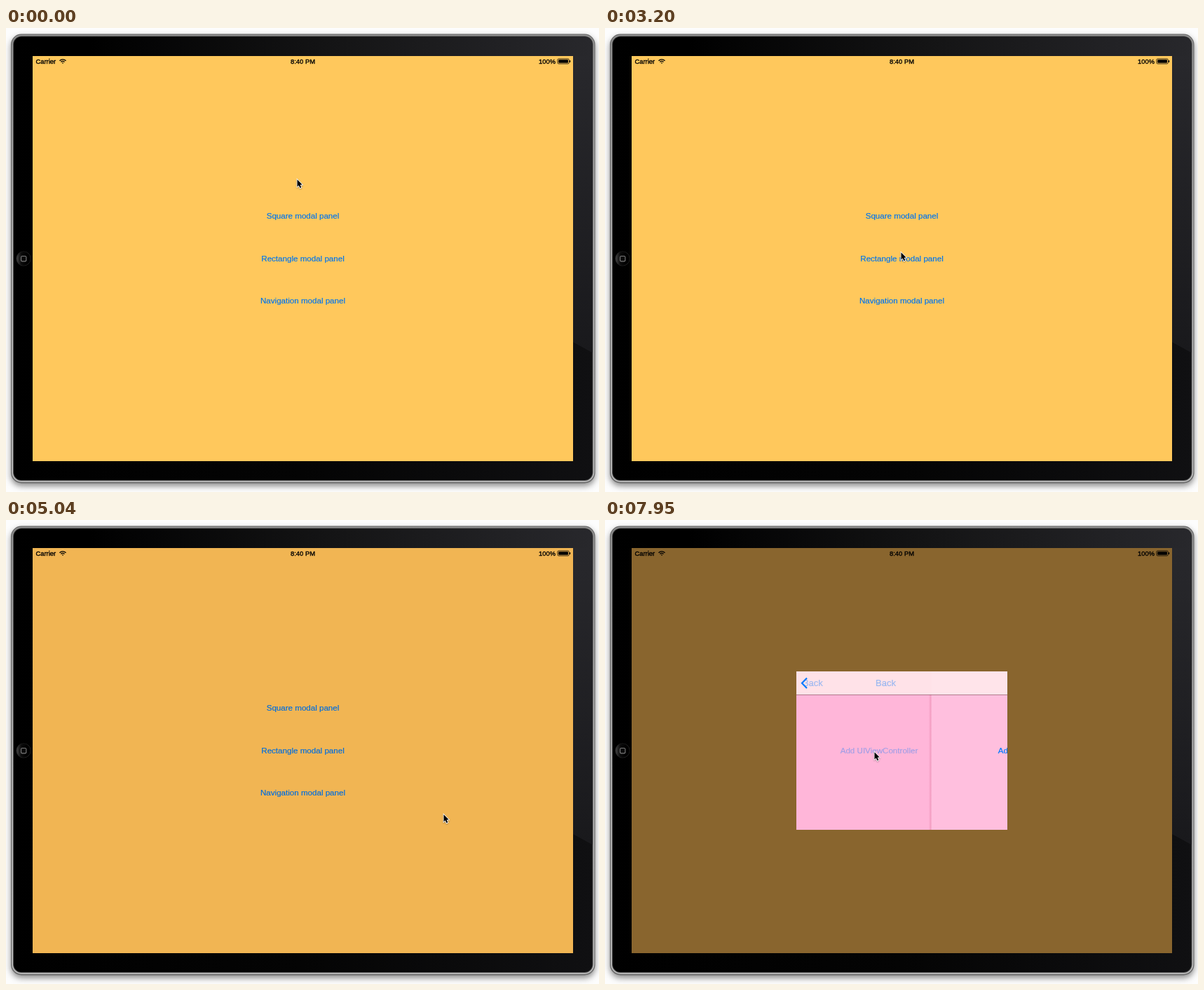
An HTML page with a canvas that plays this animation: 846 by 662 pixels, repeating every 8000 ms.

```html
<!DOCTYPE html>
<html lang="en">
<head>
<meta charset="utf-8">
<title>Modal panels</title>
<style>
html, body { margin: 0; width: 100%; height: 100%; overflow: hidden; background: #fdfdfd; }
canvas { display: block; }
</style>
</head>
<body>
<canvas id="stage" width="846" height="662"></canvas>
<script>
const ctx = document.getElementById('stage').getContext('2d');
const LOOP = 8000;
const STEP = 115;      // the picture advances in steps, like a screen capture
const FADE = 230;
const TRAVEL = 500;    // distance a panel slides
const FONT = '"Liberation Sans", Arial, sans-serif';
const BLUE = [0, 122, 255];
const SCREEN = [38, 40, 771, 578];
const MID = { x: 424, y: 329 };

const PANELS = [
  { name: 'Square modal panel', press: 1360, show: 1442, hide: 2960, w: 226, h: 226, draw: plainPanel },
  { name: 'Rectangle modal panel', press: 3760, show: 3806, hide: 4880, w: 301, h: 151, draw: plainPanel },
  { name: 'Navigation modal panel', press: 6070, show: 6156, hide: LOOP, w: 301, h: 226, draw: navPanel }
];
const TAPS = [6990, 7830];

// Pointer moves: start, duration, destination
const MOVES = [
  { at: 480, dur: 640, x: 434, y: 270 },
  { at: 2000, dur: 500, x: 422, y: 335 },
  { at: 2500, dur: 230, x: 422, y: 320 },
  { at: 3490, dur: 150, x: 422, y: 326 },
  { at: 4150, dur: 410, x: 624, y: 420 },
  { at: 5040, dur: 290, x: 469, y: 404 },
  { at: 5330, dur: 500, x: 444, y: 388 },
  { at: 6460, dur: 290, x: 384, y: 331 }
];

const SYNC = [0, ...TAPS, ...MOVES.map(m => m.at), ...PANELS.flatMap(p => [p.press, p.hide])];

const clamp = v => Math.max(0, Math.min(1, v));
const ease = v => { v = clamp(v); return v * v * (3 - 2 * v); };
const rgb = (c, a = 1) => `rgba(${c.map(Math.round).join()},${a})`;
const level = (p, t) => ease((t - p.show) / FADE) - ease((t - p.hide + 20) / FADE);

function stepped(clock) {
  const from = Math.max(...SYNC.filter(v => v <= clock));
  return from + Math.floor((clock - from) / STEP) * STEP;
}

function text(str, x, y, size, color, align = 'center', weight = 0.2) {
  ctx.font = `${size}px ${FONT}`;
  ctx.textAlign = align;
  ctx.fillStyle = ctx.strokeStyle = color;
  ctx.fillText(str, x, y);
  ctx.lineWidth = weight;
  ctx.strokeText(str, x, y);
}

function box(x, y, w, h, r, fill) {
  ctx.beginPath();
  ctx.roundRect(x, y, w, h, r);
  ctx.fillStyle = fill;
  ctx.fill();
}

function clipTo(x, y, w, h, r = 0) {
  ctx.beginPath();
  ctx.roundRect(x, y, w, h, r);
  ctx.clip();
}

function ramp(x0, y0, x1, y1, ...colors) {
  const g = ctx.createLinearGradient(x0, y0, x1, y1);
  colors.forEach((c, i) => g.addColorStop(i / (colors.length - 1), c));
  return g;
}

function trace(...points) {
  ctx.beginPath();
  points.forEach(p => ctx.lineTo(...p));
}

function tablet() {
  ctx.fillStyle = '#fdfdfd';
  ctx.fillRect(0, 0, 846, 662);
  ctx.save();
  ctx.shadowColor = 'rgba(0,0,0,.45)';
  ctx.shadowBlur = 8;
  ctx.shadowOffsetY = 4;
  box(7, 8.5, 833.5, 641, 15, '#6c6c6c');
  ctx.restore();
  box(8.3, 9.8, 831, 638, 14, ramp(0, 9, 0, 648, '#929292', '#b4b4b4', '#bdbdbd'));
  box(10, 11.5, 827.5, 634.5, 12, '#4a4a4a');

  // Black face with a diagonal gloss
  ctx.save();
  clipTo(11, 12.5, 825.5, 632.5, 11);
  ctx.fillStyle = ramp(11, 0, 837, 0, '#000', '#040404', '#101012');
  ctx.fillRect(0, 0, 846, 662);
  trace([0, 3], [0, 0], [846, 0], [846, 468]);
  ctx.fillStyle = ramp(120, 0, 837, 0, '#000', '#151516', '#28282c');
  ctx.fill();
  trace([809, 40], [837, 40], [837, 463], [809, 448]);
  ctx.fillStyle = ramp(0, 40, 0, 463, '#28282c', '#19191c');
  ctx.fill();
  ctx.restore();

  box(14.5, 318.5, 21, 21, 10.5, '#262626');
  box(15.1, 319.1, 19.8, 19.8, 9.9, ramp(15, 0, 35, 0, '#444', '#0c0c0c', '#020202', '#000'));
  box(21, 325, 8.4, 8.4, 2.2, '#7c7c7c');
  box(22.1, 326.1, 6.2, 6.2, 1.2, '#0a0a0a');
}

function statusBar() {
  const label = (str, x, align) => text(str, x, 51.3, 9.4, '#000', align, 0.35);
  label('Carrier', 42.5, 'left');
  label('8:40 PM', MID.x - 0.5);
  label('100%', 784, 'right');

  ctx.lineWidth = 1.3;
  for (const r of [1, 3.6, 6.2]) {
    ctx.beginPath();
    ctx.arc(81, 51, r, -Math.PI * 0.76, -Math.PI * 0.24);
    ctx.stroke();
  }
  ctx.beginPath();
  ctx.roundRect(786.9, 44, 16.4, 7, 1.6);
  ctx.lineWidth = 0.8;
  ctx.stroke();
  box(788.2, 45.2, 13.8, 4.6, 0.8, '#000');
  box(804, 46, 1.2, 3, 0.6, '#000');
}

function plainPanel(p, t) {
  ctx.fillStyle = '#00d0ff';
  ctx.fillRect(0, 0, p.w, p.h);
  const pressed = p === PANELS[0] && t >= p.hide;
  text('Back', p.w / 2, p.h / 2 + 3.7, 11.6, rgb(BLUE, pressed ? 0.35 : 1));
}

function navPanel(p, t) {
  const bar = 33;
  const depth = TAPS.reduce((sum, tap) => sum + 1 - (1 - clamp((t - tap - 15) / 500)) ** 2, 0);
  clipTo(0, 0, p.w, p.h);

  for (let i = 0; i < 3; i++) {
    const r = i - depth;
    if (r <= -1 || r >= 1) continue;
    const x = r * p.w * (r < 0 ? 0.3 : 1);
    if (r > 0) {
      ctx.fillStyle = ramp(x - 4, 0, x, 0, 'rgba(200,70,110,0)', 'rgba(200,70,110,.28)');
      ctx.fillRect(x - 4, bar, 4, p.h);
    }
    ctx.fillStyle = rgb([255, 191 + 25 * Math.min(r, 0), 222 + 15 * Math.min(r, 0)]);
    ctx.fillRect(x, 0, p.w, p.h);
    text('Add UIViewController', x + p.w / 2, p.h / 2 + 3.5, 11.6, rgb(BLUE, t >= TAPS[i] ? 0.33 : 1));
  }

  ctx.fillStyle = 'rgba(255,240,238,.75)';
  ctx.fillRect(0, 0, p.w, bar);
  ctx.fillStyle = 'rgba(120,80,90,.6)';
  ctx.fillRect(0, bar, p.w, 1);

  // Back labels slide in from the middle and out to the left
  ctx.save();
  clipTo(13, 0, p.w, bar);
  for (const i of [1, 2]) {
    const r = i - depth;
    const alpha = r > 0 ? 1 - r : 1 + 1.8 * r;
    text('Back', 19 + r * (r > 0 ? 147 : 28), 21.2, 13, rgb(BLUE, clamp(alpha)), 'left');
  }
  ctx.restore();
  trace([15, 9.5], [8, 16.7], [15, 24]);
  ctx.lineWidth = 2.2;
  ctx.strokeStyle = rgb(BLUE, clamp(depth));
  ctx.stroke();
}

function pointer(t) {
  let x = 415, y = 216;
  for (const m of MOVES) {
    const f = clamp((t - m.at) / m.dur);
    x += (m.x - x) * f;
    y += (m.y - y) * f;
  }
  ctx.save();
  ctx.translate(Math.round(x) + 0.5, Math.round(y) + 0.3);
  ctx.scale(0.9, 0.9);
  trace([0, 0], [0, 11.3], [2.5, 9.1], [4.4, 13.4], [6.4, 12.5], [4.6, 8.4], [7.9, 8.1]);
  ctx.closePath();
  ctx.shadowColor = 'rgba(0,0,0,.3)';
  ctx.shadowBlur = 2;
  ctx.shadowOffsetY = 1;
  ctx.lineWidth = 1.8;
  ctx.strokeStyle = '#fff';
  ctx.stroke();
  ctx.shadowColor = 'transparent';
  ctx.fillStyle = '#000';
  ctx.fill();
  ctx.restore();
}

function screen(t) {
  const dim = Math.max(...PANELS.map(p => level(p, t)));
  const shade = 1 - 0.495 * dim ** 0.78;
  ctx.save();
  clipTo(...SCREEN);
  ctx.fillStyle = rgb([255 * (1 - 0.463 * dim), 200 * shade, 92 * shade]);
  ctx.fillRect(...SCREEN);

  const ink = [0, 118, 238].map(v => v * (1 - 0.55 * dim));
  PANELS.forEach((p, i) => {
    const pressed = t >= p.press && t < p.hide;
    text(p.name, MID.x - 0.5, 272.4 + 60.2 * i, 11.58, rgb(ink, pressed ? Math.min(1, 0.35 + 0.85 * dim) : 1));
  });
  statusBar();

  for (const p of PANELS) {
    const up = level(p, t);
    if (up <= 0) continue;
    ctx.save();
    ctx.translate(Math.floor(MID.x - p.w / 2), Math.floor(MID.y - p.h / 2 + (1 - up) * TRAVEL));
    p.draw(p, t);
    ctx.restore();
  }
  ctx.restore();
}

function frame(now) {
  const t = stepped(now % LOOP);
  tablet();
  screen(t);
  pointer(t);
  requestAnimationFrame(frame);
}
frame(0);
</script>
</body>
</html>
```
